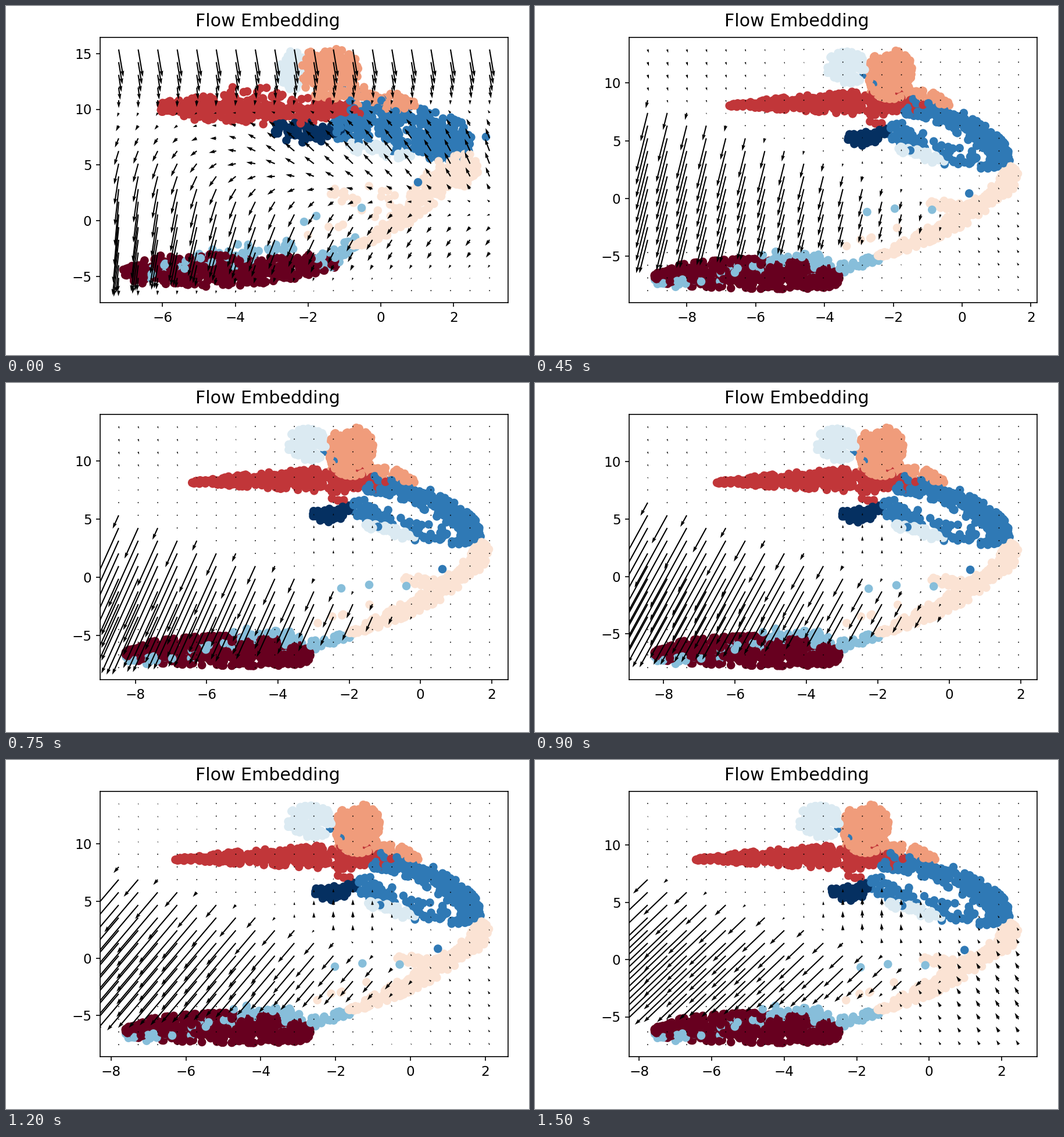
Animation of 900x600 px, one loop 1.65 s. Source, as a matplotlib script:

```python
import numpy as np
import matplotlib.pyplot as plt
from matplotlib.animation import FuncAnimation

W, H, DPI = 900, 600, 150
L, R, T, B = 162, 864, 54, 510
STEP_MS = 150
rng = np.random.default_rng(4)
COLORS = plt.get_cmap("RdBu")(np.linspace(0, 1, 8))
MAROON, RED, SALMON, PEACH, PALE, SKY, BLUE, NAVY = range(8)

# Colour, count, depth, then curve and end half-widths in the early and the late shape
BANDS = [
    (MAROON, 560, .5, [(203, 457), (320, 455), (430, 455), (568, 440)], (26, 18),
     [(205, 464), (310, 461), (415, 461), (524, 469)], (20, 26)),
    (SKY, 70, .6, [(240, 460), (360, 435), (500, 412)], (22, 16),
     [(206, 470), (300, 468), (400, 438), (500, 438)], (12, 12)),
    (SKY, 45, .7, [(535, 445), (570, 425), (604, 404)], (14, 12),
     [(470, 450), (535, 446), (595, 432)], (14, 7)),
    (PEACH, 330, 1.7, [(598, 412), (690, 355), (750, 296), (812, 285)], (4, 34),
     [(590, 430), (690, 388), (785, 330), (818, 273)], (8, 18)),
    (PEACH, 24, 1.7, [(558, 326), (705, 332)], (20, 22), [(685, 338), (738, 341)], (6, 8)),
    (PEACH, 5, .3, [(475, 403), (640, 360)], (4, 4), [(500, 423), (628, 380)], (4, 4)),
    (PALE, 100, 1, [(498, 80), (488, 140)], (18, 18), [(486, 106), (550, 106)], (24, 26)),
    (PALE, 42, 1.7, [(590, 237), (702, 260)], (10, 8), [(617, 242), (704, 267)], (7, 7)),
    (BLUE, 320, 1.2, [(568, 208), (650, 192), (740, 222), (797, 246)], (18, 44),
     [(622, 186), (690, 186), (775, 230), (806, 270)], (14, 18)),
    (BLUE, 95, 1.2, [(568, 212), (640, 222), (772, 256)], (18, 22),
     [(598, 206), (680, 245), (806, 274)], (20, 14)),
    (BLUE, 12, 1.1, [(570, 150), (650, 160)], (15, 10), [(535, 120), (640, 158)], (8, 8)),
    (NAVY, 80, 1.2, [(460, 206), (510, 217), (578, 210)], (18, 16),
     [(527, 221), (555, 228), (592, 212)], (8, 12)),
    (SALMON, 240, 1.3, [(512, 114), (606, 114)], (40, 38), [(557, 118), (632, 118)], (38, 38)),
    (SALMON, 70, 1.3, [(590, 150), (709, 172)], (22, 8),
     [(560, 148), (640, 150), (709, 174)], (16, 5)),
    (RED, 370, 1.1, [(266, 174), (430, 178), (605, 180)], (18, 22),
     [(320, 171), (490, 167), (655, 171)], (5, 24)),
    (RED, 16, 1.2, [(370, 150), (525, 146)], (16, 10), [(500, 160), (560, 146)], (12, 10)),
    (RED, 4, 1.2, [(560, 195), (610, 140)], (4, 4), [(557, 196), (588, 204)], (4, 4)),
]
LONE = [(SKY, (513, 371), (577, 353)), (SKY, (534, 361), (625, 347)),
        (SKY, (612, 347), (689, 349)), (BLUE, (709, 303), (751, 320)),
        (BLUE, (826, 225), (811, 255))]

# One value per key pose
X_ZERO = [645, 762, 735, 713, 712.5, 696, 678.3]
X_UNIT = [62.6, 56.8, 59.2, 61.25, 61.6, 64.4, 62.4]
Y_ZERO = [369, 337.2, 331, 334, 331, 341, 343]
Y_UNIT = [19.15, 19.93, 19.87, 20, 19.47, 19.67, 19.7]
CROWN = [0, 48, 18, 0, 4, 12, -25]
ONSET = [0, .23, .19, .35, .24, .25, .28]
REACH = [0, 100, 80, 150, 112, 95, 80]

# Pose at each step; halves lie midway between two poses
STEPS = [0, 0, 1, 2, 2.5, 3, 3.5, 4, 5, 5.5, 6]


def at(values, pose):
    return np.interp(pose, range(len(values)), values)


def band(points, widths, t, s):
    """Spread points around a smooth curve, thinner towards its ends."""
    knots = np.linspace(0, 1, len(points))
    x, y = (np.polyfit(knots, c, len(points) - 1) for c in np.array(points, float).T)
    dx, dy = np.polyval(np.polyder(x), t), np.polyval(np.polyder(y), t)
    w = s * np.interp(t, [0, 1], widths) * np.sin(np.pi * t) ** .3 / np.hypot(dx, dy)
    return np.c_[np.polyval(x, t) - dy * w, np.polyval(y, t) + dx * w]


def build_dots():
    early, late, hue, depth = [], [], [], []
    for color, n, z, first, w1, last, w2 in BANDS:
        t = rng.uniform(0, 1, n)
        s = np.clip(rng.normal(0, .6, n), -1.1, 1.1)
        early.append(band(first, w1, t, s) + rng.normal(0, 2, (n, 2)))
        late.append(band(last, w2, t, s))
        hue += [color] * n
        depth += list(z + rng.normal(0, .25, n))
    for color, first, last in LONE:
        early.append([first])
        late.append([last])
        hue.append(color)
        depth.append(3)
    order = np.argsort(depth)
    return np.vstack(early)[order], np.vstack(late)[order], COLORS[np.array(hue)[order]]


def place(pose):
    if pose == 0:
        return EARLY
    x, y = LATE.T
    away = abs(pose - 3)
    high = 1 / (1 + np.exp((y - 235) / 20)) * np.clip((820 - x) / 200, 0, 1)
    tip = np.clip((560 - x) / 240, 0, 1)
    wisp = np.exp(-((y - 340) / 45) ** 2) * np.clip((830 - x) / 100, 0, 1)
    dx = high * (at(CROWN, pose) * (1 - tip) - 15 * (pose - 3) * tip) - 6 * away * wisp
    dy = 2.5 * away * np.exp(-((y - 300) / 60) ** 2)
    return np.c_[x + dx, y + dy]


def bump(z, center, below, above):
    return np.exp(-((z - center) / np.where(z < center, below, above)) ** 2)


def patch(a, b, ra, rb):
    return bump(gx, a, ra, ra) * bump(gy, b, rb, rb)


def swirl():
    top = np.clip(1 - gy / .27, 0, None)
    side = 1 / (1 + np.exp((.27 - gx) / .08))
    fade = 1 - .5 * np.clip(gx - .7, 0, None) / .3
    fall = 90 * bump(gy, .76, .3, .16) * np.exp(-(gx / .38) ** 1.3)
    low = bump(gy, .8, .12, .1)
    u = 8 * top - 15 * bump(gy, .43, .18, .19) * (.4 + .6 * side) * fade
    u -= fall * (.05 + .5 * gx) + 6 * low
    v = -47 * top + 22 * bump(gy, .44, .16, .18) * side - fall - 8 * low
    return u, v


def stream(pose):
    reach = at(REACH, pose)
    ramp = np.clip((gy - at(ONSET, pose) - .5 * gx) / .12, 0, 1)
    size = reach * np.clip(1 - gx / .87, 0, None) * ramp
    room = 414 * np.clip(.8 + .0016 * reach - .2 * gx - gy, 0, None)
    size = np.where(gy < .81, np.minimum(size, room), 0)
    calm = size < 3
    top = 14 / pose * patch(0, .08, .4, .2) * calm
    rise = 2.2 * pose * patch(.6, .47, .16, .13) * calm
    edge = 12 * np.cos(np.pi * (pose - 1) / 5) ** 4 * patch(1, .8, .35, .3) * calm
    lean = .05 + .2 * (pose - 1)
    return .3 * top - .6 * edge - lean * size, rise + edge - top - size


gx, gy = np.meshgrid(np.linspace(0, 1, 20), np.linspace(0, 1, 20))
EARLY, LATE, DOT_COLORS = build_dots()

fig = plt.figure(figsize=(W / DPI, H / DPI), dpi=DPI, facecolor="white")
box = [L / W, 1 - B / H, (R - L) / W, (B - T) / H]
stage = fig.add_axes(box, zorder=1)
stage.axis("off")
dots = stage.scatter(*EARLY.T, s=30, c=DOT_COLORS, linewidths=1.5, zorder=1)
arrows = stage.quiver(L + 31.9 + gx * 638.2, T + 20.7 + gy * 414.6, *swirl(),
                      angles="uv", units="dots", scale_units="dots", scale=1,
                      width=2.1, color="black", zorder=2)
stage.set(xlim=(L, R), ylim=(B, T))

frame = fig.add_axes(box, zorder=2)
frame.patch.set_visible(False)
frame.set_xticks(range(-10, 4, 2))
frame.set_yticks(range(-5, 16, 5))
frame.tick_params(labelsize=11.1, length=3.2, pad=3.8)
fig.suptitle("Flow Embedding", fontsize=14.4, y=.98)


def draw(n):
    pose = STEPS[n]
    x0, sx = at(X_ZERO, pose), at(X_UNIT, pose)
    y0, sy = at(Y_ZERO, pose), at(Y_UNIT, pose)
    frame.set_xlim((L - x0) / sx, (R - x0) / sx)
    frame.set_ylim((y0 - B) / sy, (y0 - T) / sy)
    dots.set_offsets(place(pose))
    arrows.set_UVC(*(stream(pose) if pose else swirl()))
    return dots, arrows


anim = FuncAnimation(fig, draw, frames=len(STEPS), interval=STEP_MS,
                     repeat=True, repeat_delay=0, blit=False)
plt.show()
```
